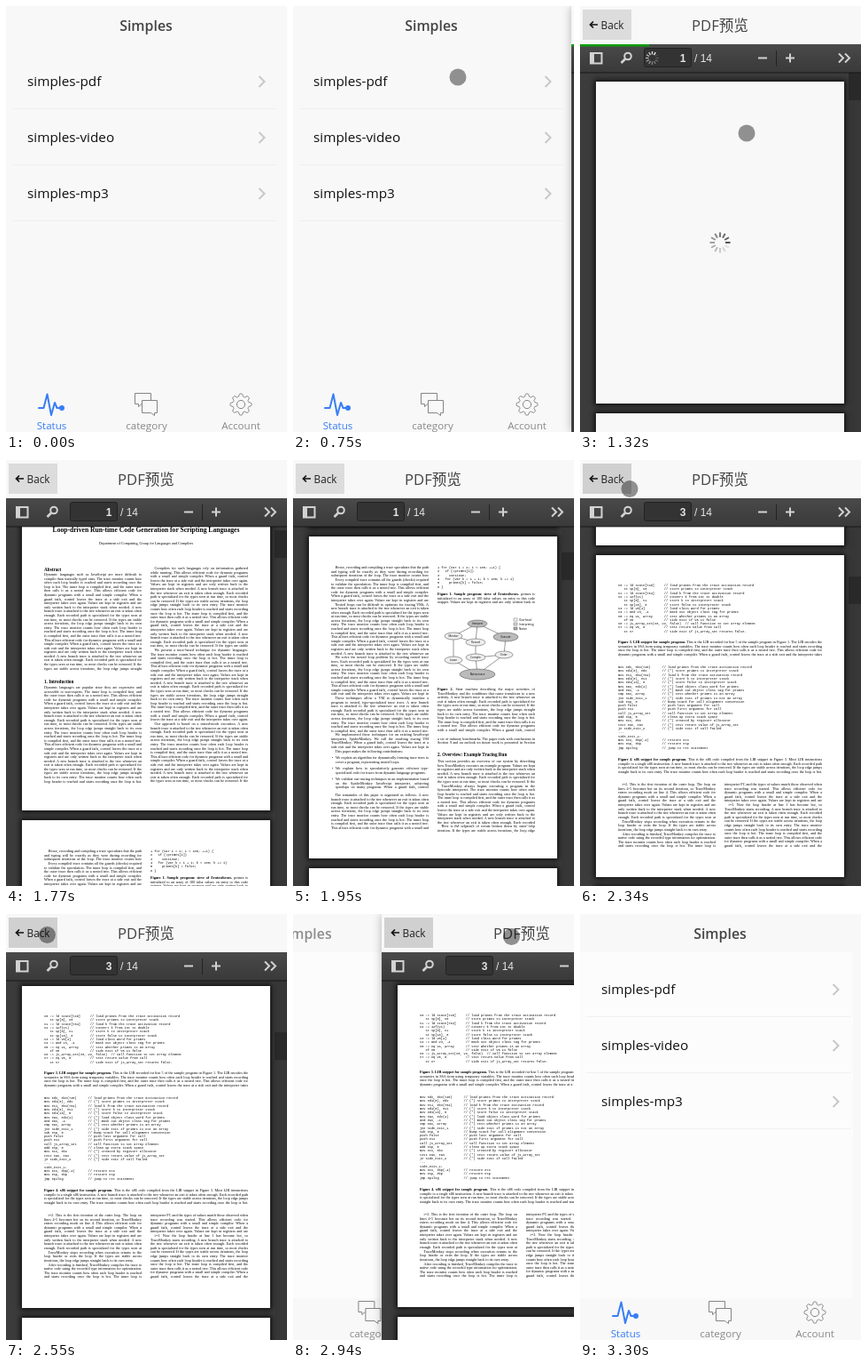
These frames come from a looping animation (317 by 479 pixels, 3.63 s). An HTML page:

```html
<!DOCTYPE html>
<html lang="en">
<head>
<meta charset="utf-8">
<title>Document list and viewer</title>
<style>
html, body { margin: 0; width: 100%; height: 100%; overflow: hidden; background: #f8f8f8; }
#stage { position: absolute; left: 0; top: 0; width: 317px; height: 479px; overflow: hidden; background: #f8f8f8; }
#stage div, #stage svg { position: absolute; }
svg { left: 0; top: 0; overflow: visible; }
svg text { font-family: "Open Sans", "Noto Sans", "Noto Sans CJK SC", sans-serif; }
.screen { left: 0; top: 0; width: 317px; height: 479px; }
#viewer { background: #3b3b3b; box-shadow: 0 0 10px rgba(0,0,0,.28); }
#port { left: 0; top: 75px; width: 317px; height: 404px; overflow: hidden; background: #3c3c3c; }
#track { left: 303px; top: 0; width: 14px; height: 404px; background: rgba(0,0,0,.08); }
#thumb { width: 14px; height: 31px; background: rgba(0,0,0,.25); }
.sheet { left: 18px; width: 280px; height: 362px; background: #fff; box-shadow: 0 0 6px 2px rgba(0,0,0,.75); color: #000; }
.loading .sheet { background: #f8f8f8; }
.loading .sheet * { visibility: hidden; }
#viewer:not(.loading) .wait { display: none; }
.prose { overflow: hidden; font: 4.15px/4.6px "Liberation Serif", serif; text-align: justify; }
.code { font: 3.6px/4.32px "Liberation Mono", monospace; white-space: pre; }
.head { font: bold 5.2px/6px "Liberation Serif", serif; white-space: nowrap; }
#dot { left: -9.5px; top: -9.5px; width: 19px; height: 19px; border-radius: 50%; background: rgba(0,0,0,.42); }
</style>
</head>
<body>
<div id="stage">
  <div class="screen" id="home">
    <svg width="317" height="479">
      <rect width="317" height="479" fill="#f8f8f8"/>
      <rect id="sheen" y="43" width="308" height="389" fill="#fcfcfc"/>
      <text id="homeTitle" x="158" y="27.5" text-anchor="middle" font-size="15.9" font-weight="600" fill="#444">Simples</text>
      <g id="list" font-size="15.3" fill="#111"></g>
      <g font-size="11.6" text-anchor="middle" fill="#888">
        <text x="51.5" y="476" fill="#387ef5">Status</text>
        <text x="158.5" y="476">category</text>
        <text x="265" y="476">Account</text>
      </g>
      <g fill="none" stroke="#387ef5" stroke-width="2" stroke-linejoin="round" stroke-linecap="round">
        <path d="M37 452H42.5L46.5 436.5 51 460 55 446 57.5 452H62"/>
        <circle cx="63" cy="452" r="2" fill="#387ef5"/>
      </g>
      <g fill="none" stroke="#858585">
        <path d="M153 447.5 149.5 450.5V447.5H145.5V435.5H163.5V443"/>
        <path d="M153.5 443.5H170.5V457.5H167.5V460.5L163.5 457.5H153.5Z"/>
        <path id="gear"/>
        <circle cx="265" cy="448" r="4.6"/>
      </g>
    </svg>
  </div>

  <div class="screen loading" id="viewer">
    <div id="port">
      <div id="roll"></div>
      <div id="track"><div id="thumb"></div></div>
    </div>
    <svg width="317" height="479">
      <defs>
        <linearGradient id="tool" x2="0" y2="1"><stop stop-color="#4a4a4a"/><stop offset="1" stop-color="#393939"/></linearGradient>
      </defs>
      <rect width="317" height="43" fill="#f8f8f8"/>
      <rect y="43" width="317" height="32" fill="url(#tool)"/>
      <rect y="74" width="317" height="2" fill="#000" opacity=".3"/>
      <rect id="back" x="3" y="4" width="55" height="34"/>
      <path d="M11.5 21H20M15 17.5 11.5 21 15 24.5" fill="none" stroke="#111" stroke-width="1.7"/>
      <text x="23.5" y="25.5" font-size="11.8" fill="#222">Back</text>
      <text x="158" y="28" text-anchor="middle" font-size="16.6" fill="#444">PDF预览</text>
      <g fill="none" stroke="#d2d2d2" stroke-width="2">
        <path d="M12 53H24.5V64.5H12Z"/>
        <path d="M14 53V64.5" stroke-width="4"/>
        <circle cx="54" cy="56.5" r="3.8"/>
        <path d="M51 59.5 46.5 64" stroke-width="2.6"/>
        <path d="M201 58.5H211M232 58.5H242M237 53.5V63.5"/>
        <path d="M292 53.5 297 58.5 292 63.5M299 53.5 304 58.5 299 63.5"/>
        <path d="M221.5 50V68" stroke="#222" stroke-width="1"/>
      </g>
      <rect x="72.5" y="47.5" width="53" height="21" rx="2" fill="#333" stroke="#222"/>
      <g font-size="12" fill="#e4e4e4">
        <text id="num" x="119.5" y="62.5" text-anchor="end" font-weight="bold" style="font-family:'Liberation Sans',sans-serif">1</text>
        <text x="129" y="62.5" style="font-family:'Liberation Sans',sans-serif">/ 14</text>
      </g>
      <g class="wait">
        <rect id="bar" y="43" height="2.5" fill="#0a9d0a"/>
        <g id="spinSmall" stroke="#fff" stroke-width="1.4"></g>
        <g id="spinBig" stroke="#444" stroke-width="2"></g>
      </g>
    </svg>
  </div>
  <div id="dot"></div>
</div>

<script>
const LOOP = 3630, STEP = 30, W = 317, PITCH = 373;
const $ = id => document.getElementById(id);
const clamp = v => Math.min(1, Math.max(0, v));

// Home list and gear
["simples-pdf", "simples-video", "simples-mp3"].forEach((name, i) => {
  const y = 63 * i;
  $("list").innerHTML += `<text x="24" y="${90 + y}">${name}</text>
    <path d="M285.5 ${79 + y}l6 6-6 6" fill="none" stroke="#c8c8c8" stroke-width="2"/>
    <path d="M8 ${115.5 + y}H306" stroke="#f0f0f0"/>`;
});
let gear = "";
for (let i = 0; i < 96; i++) {
  const a = i / 96 * 2 * Math.PI, r = 10.5 + 1.5 * Math.tanh(2.5 * Math.cos(8 * a));
  gear += (i ? "L" : "M") + (265 + r * Math.cos(a)).toFixed(2) + " " + (448 + r * Math.sin(a)).toFixed(2);
}
$("gear").setAttribute("d", gear + "Z");

// Spinners
function spokes(id, r0, r1) {
  for (let i = 0; i < 12; i++)
    $(id).innerHTML += `<path d="M0 ${-r0}V${-r1}" transform="rotate(${i * 30})" opacity="${0.12 + 0.073 * i}"/>`;
}
spokes("spinSmall", 4, 7.5);
spokes("spinBig", 6, 11.5);

// Document pages
const LINES = [
  "The trace monitor counts how often each loop header is reached and starts recording once the loop is hot.",
  "When a guard fails, control leaves the trace at a side exit and the interpreter takes over again.",
  "Each recorded path is specialized for the types seen at run time, so most checks can be removed.",
  "The inner loop is compiled first, and the outer trace then calls it as a nested tree.",
  "Values are kept in registers and are only written back to the interpreter stack when needed.",
  "If the types are stable across iterations, the loop edge jumps straight back to its own entry.",
  "This allows efficient code for dynamic programs with a small and simple compiler.",
  "A new branch trace is attached to the tree whenever an exit is taken often enough."
];
let pick = 0;
function sheet(i) {
  const el = document.createElement("div");
  el.className = "sheet";
  el.style.top = 10 + PITCH * i + "px";
  $("roll").append(el);
  return el;
}
function put(page, cls, x, y, text, w) {
  const el = document.createElement("div");
  el.className = cls;
  el.style.cssText = `left:${x}px;top:${y}px;` + (w ? `width:${w}px;` : "");
  el.textContent = text;
  page.append(el);
  return el;
}
function prose(page, x, y, rows, start, w = 110, indent = 4.6) {
  let text = start;
  while (text.length < rows * w * 0.62 - 30) text += " " + LINES[pick++ * 3 % LINES.length];
  const el = put(page, "prose", x, y, text, w);
  el.style.height = rows * 4.6 + "px";
  el.style.textIndent = indent + "px";
  return el;
}
function caption(page, x, y, rows, label, rest, w) {
  const el = prose(page, x, y, rows, rest, w, 0), b = document.createElement("b");
  b.textContent = label + " ";
  el.prepend(b);
}
function listing(page, y, col, rows) {
  put(page, "code", 25, y, rows.map(r => {
    const [op, note] = r.split("|");
    return note ? op.padEnd(col) + "// " + note : op;
  }).join("\n"));
}
const L = 25, R = 145;

const p1 = sheet(0);
const title = put(p1, "head", 25, 42, "Loop-driven Run-time Code Generation for Scripting Languages", 230);
title.style.cssText += "text-align:center;font-size:7.6px;line-height:9px";
const names = put(p1, "prose", 45, 60, "Department of Computing, Group for Languages and Compilers", 190);
names.style.textAlign = "center";
put(p1, "head", L, 88, "Abstract");
prose(p1, L, 95, 24, "Dynamic languages such as JavaScript are more difficult to compile than statically typed ones.", 110, 0);
put(p1, "head", L, 214, "1.  Introduction");
prose(p1, L, 222, 24, "Dynamic languages are popular since they are expressive and accessible to non-experts.", 110, 0);
prose(p1, R, 88, 20, "Compilers for such languages rely on information gathered while running.");
prose(p1, R, 180, 18, "We present a trace-based technique for dynamic languages.");
prose(p1, R, 263, 15, "Our approach is based on a mixed-mode execution.");

const p2 = sheet(1);
[[33, 3, "Hence, recording and compiling a trace speculates that the path and typing will be exactly as they were during recording for subsequent iterations of the loop."],
 [47, 6, "Every compiled trace contains all the guards (checks) required to validate the speculation."],
 [74.5, 13, "Nested loops can be difficult to optimize for tracing VMs."],
 [134, 10, "We solve the nested loop problem by recording nested trace trees."],
 [180, 9, "These techniques allow a VM to dynamically translate a program to nested, type-specialized trace trees."],
 [221, 4, "We implemented these techniques for an existing JavaScript interpreter, SpiderMonkey. We call the resulting tracing VM TraceMonkey."],
 [239.5, 1, "This paper makes the following contributions:"],
 [289, 9, "The remainder of this paper is organized as follows."]
].forEach(([y, n, s]) => prose(p2, L, y, n, s));
["We explain an algorithm for dynamically forming trace trees to cover a program, representing nested loops.",
 "We explain how to speculatively generate efficient type-specialized code for traces from dynamic language programs.",
 "We validate our tracing techniques in an implementation based on the SpiderMonkey JavaScript interpreter, achieving speedups on many programs."
].forEach((s, i) => {
  put(p2, "prose", L + 1, 247 + i * 12, "•");
  prose(p2, L + 5, 247 + i * 12, i < 2 ? 2 : 3, s, 105, 0);
});
put(p2, "code", R, 33, `1 for (var i = 2; i < 100; ++i) {
2   if (!primes[i])
3     continue;
4   for (var k = i + i; k < 100; k += i)
5     primes[k] = false;
6 }`);
caption(p2, R, 63, 3, "Figure 1. Sample program: sieve of Eratosthenes.", "primes is initialized to an array of 100 false values on entry to this code snippet.");
const NODES = [["Interpret", 190, 98, 11, 4, 1], ["Monitor", 163, 112, 10, 4, 0], ["Record", 188, 119, 11, 4, 0],
  ["Execute", 222, 113, 14, 5, 1], ["Compile", 188, 136, 11, 4, 0], ["Enter", 220, 133, 10, 4, 0],
  ["Leave", 163, 139, 10, 4, 0], ["Native trace", 190, 155, 20, 6, 1]];
const LINKS = [0, 1, 0, 2, 0, 3, 1, 2, 2, 4, 3, 5, 4, 7, 5, 7, 6, 7, 1, 6, 4, 5];
let art = "";
for (let i = 0; i < LINKS.length; i += 2) {
  const a = NODES[LINKS[i]], b = NODES[LINKS[i + 1]];
  art += `<path d="M${a[1]} ${a[2]}L${b[1]} ${b[2]}" stroke="#333" stroke-width=".5"/>`;
}
NODES.forEach(([s, x, y, rx, ry, dark]) => art += `<ellipse cx="${x}" cy="${y}" rx="${rx}" ry="${ry}" fill="${dark ? "#bbb" : "#eee"}" stroke="#444" stroke-width=".5"/>
  <text x="${x}" y="${y + 1}" font-size="3" text-anchor="middle">${s}</text>`);
["Overhead", "Interpreting", "Native"].forEach((s, i) => art += `<rect x="231" y="${92 + 5 * i}" width="4" height="3" fill="${["#fff", "#ddd", "#aaa"][i]}" stroke="#444" stroke-width=".4"/>
  <text x="237" y="${95 + 5 * i}" font-size="3">${s}</text>`);
p2.insertAdjacentHTML("beforeend", `<svg width="280" height="362">${art}</svg>`);
caption(p2, R, 170, 11, "Figure 2.", "State machine describing the major activities of TraceMonkey and the conditions that cause transitions to a new activity.");
prose(p2, R, 225.5, 2, "a set of industry benchmarks. The paper ends with conclusions in Section 9 and an outlook on future work is presented in Section 10.", 110, 0);
put(p2, "head", R, 242, "2.   Overview: Example Tracing Run");
prose(p2, R, 251, 6, "This section provides an overview of our system by describing how TraceMonkey executes an example program.", 110, 0);
prose(p2, R, 278.5, 10, "TraceMonkey always begins executing a program in the bytecode interpreter.");
prose(p2, R, 324, 2, "Here is the sequence of events broken down by outer loop iteration.");

const p3 = sheet(2);
listing(p3, 32, 24, ["v0 := ld state[748]|load primes from the trace activation record", "   st sp[0], v0|store primes to interpreter stack",
  "v1 := ld state[764]|load k from the trace activation record", "v2 := i2f(v1)|convert k from int to double",
  "   st sp[8], v1|store k to interpreter stack", "   st sp[16], 0|store false to interpreter stack",
  "v3 := ld v0[4]|load class word for primes", "v4 := and v3, -4|mask out object class tag for primes",
  "v5 := eq v4, Array|test whether primes is an array", "   xf v5|side exit if v5 is false",
  "v6 := js_Array_set(v0, v2, false)  // call function to set array element", "v7 := eq v6, 0|test return value from call",
  "   xt v7|side exit if js_Array_set returns false."]);
caption(p3, L, 96, 4, "Figure 3. LIR snippet for sample program.", "This is the LIR recorded for line 5 of the sample program in Figure 1. The LIR encodes the semantics in SSA form using temporary variables.", 230);
listing(p3, 124, 23, ["mov edx, ebx(748)|load primes from the trace activation record", "mov edi(0), edx|(*) store primes to interpreter stack",
  "mov esi, ebx(764)|load k from the trace activation record", "mov edi(8), esi|(*) store k to interpreter stack",
  "mov edi(16), 0|(*) store false to interpreter stack", "mov eax, edx(4)|(*) load object class word for primes",
  "and eax, -4|(*) mask out object class tag for primes", "cmp eax, Array|(*) test whether primes is an array",
  "jne side_exit_1|(*) side exit if primes is not an array", "sub esp, 8|bump stack for call alignment convention",
  "push false|push last argument for call", "push esi|push first argument for call",
  "call js_Array_set|call function to set array element", "add esp, 8|clean up extra stack space",
  "mov ecx, ebx|(*) created by register allocator", "test eax, eax|(*) test return value of js_Array_set",
  "je side_exit_2|(*) side exit if call failed", "...", "side_exit_1:", "mov ecx, ebp(-4)|restore ecx",
  "mov esp, ebp|restore esp", "jmp epilog|jump to ret statement"]);
caption(p3, L, 228, 4, "Figure 4. x86 snippet for sample program.", "This is the x86 code compiled from the LIR snippet in Figure 3. Most LIR instructions compile to a single x86 instruction.", 230);
prose(p3, L, 256, 9, "i=2. This is the first iteration of the outer loop. The loop on lines 4-5 becomes hot on its second iteration, so TraceMonkey enters recording mode on line 4.");
prose(p3, L, 297.5, 3, "TraceMonkey stops recording when execution returns to the loop header or exits the loop.");
prose(p3, L, 311.5, 4, "After recording is finished, TraceMonkey compiles the trace to native code using the recorded type information for optimization.");
prose(p3, R, 256, 5, "interpreter PC and the types of values match those observed when trace recording was started.", 110, 0);
prose(p3, R, 279, 11, "i=3. Now the loop header at line 1 has become hot, so TraceMonkey starts recording.");
sheet(3);

// Motion
const coord = (u, a, b) => 3 * a * u * (1 - u) ** 2 + 3 * b * u * u * (1 - u) + u ** 3;
function slide(p) {
  if (p <= 0 || p >= 1) return clamp(p);
  let lo = 0, hi = 1;
  for (let i = 0; i < 30; i++) {
    const mid = (lo + hi) / 2;
    if (coord(mid, .36, .04) < p) lo = mid; else hi = mid;
  }
  return coord(lo, .66, 1);
}
const scrollAt = t => t < 1950
  ? 372 * clamp((t - 1740) / 210)
  : 372 + 379 * (1 - (1 - clamp((t - 1950) / 690)) ** 3.18);

const PATHS = [
  [[90, 278, 41.5], [150, 232, 60], [210, 200, 73], [270, 185.5, 79.5], [1020, 185.5, 79.5], [1230, 187.5, 142.5], [1500, 187.5, 142.5]],
  [[2190, 160, -10], [2280, 85, 9], [2310, 68, 25], [2340, 55.5, 32], [2430, 46, 23], [2850, 46, 23], [2940, 246, 25], [3000, 332, 20]]
];
function dotAt(t) {
  for (const path of PATHS)
    for (let i = 1; i < path.length; i++) {
      const a = path[i - 1], b = path[i];
      if (t >= a[0] && t < b[0]) {
        const k = (t - a[0]) / (b[0] - a[0]);
        return [a[1] + (b[1] - a[1]) * k, a[2] + (b[2] - a[2]) * k];
      }
    }
  return null;
}
const move = (el, x, y = 0) => el.style.transform = `translate(${x}px,${y}px)`;

function draw(t) {
  const leaving = t >= 2850, back = slide((t - 2880) / 440);
  let x = W;
  if (leaving) x = W * back;
  else if (t >= 750) x = Math.min(W - 3, W * (1 - slide((t - 845) / 415)));
  x = Math.round(x);
  const shown = x / W;

  move($("viewer"), x);
  $("viewer").style.visibility = x < W ? "visible" : "hidden";
  move($("home"), -0.33 * W * (1 - shown));
  $("homeTitle").setAttribute("transform", `translate(${-106 * (1 - shown)})`);
  $("homeTitle").setAttribute("opacity", 0.4 + 0.6 * shown);
  $("list").style.display = leaving && shown < .35 ? "none" : "";
  $("sheen").style.display = leaving ? "" : "none";

  const s = scrollAt(t);
  move($("roll"), 0, -Math.round(s));
  move($("thumb"), 0, s * 404 / (PITCH * 14));
  $("num").textContent = t <= 1950 ? 1 : s < 560 ? 2 : 3;
  $("back").setAttribute("fill", t >= 2310 ? "#d0d0d0" : "#dcdcdc");

  $("viewer").classList.toggle("loading", t < 1500);
  $("bar").setAttribute("width", Math.max(8, (t - 750) * .137));
  const turn = Math.floor(t / 90) * 30;
  $("spinSmall").setAttribute("transform", `translate(81.5 58.5) rotate(${turn})`);
  $("spinBig").setAttribute("transform", `translate(158 266) rotate(${turn + 60})`);

  const d = dotAt(t);
  $("dot").style.display = d ? "" : "none";
  if (d) move($("dot"), d[0], d[1]);
}

const start = performance.now();
function tick() {
  const t = (performance.now() - start) % LOOP;
  draw(Math.floor(t / STEP) * STEP);
  requestAnimationFrame(tick);
}
draw(0);
tick();
</script>
</body>
</html>
```
